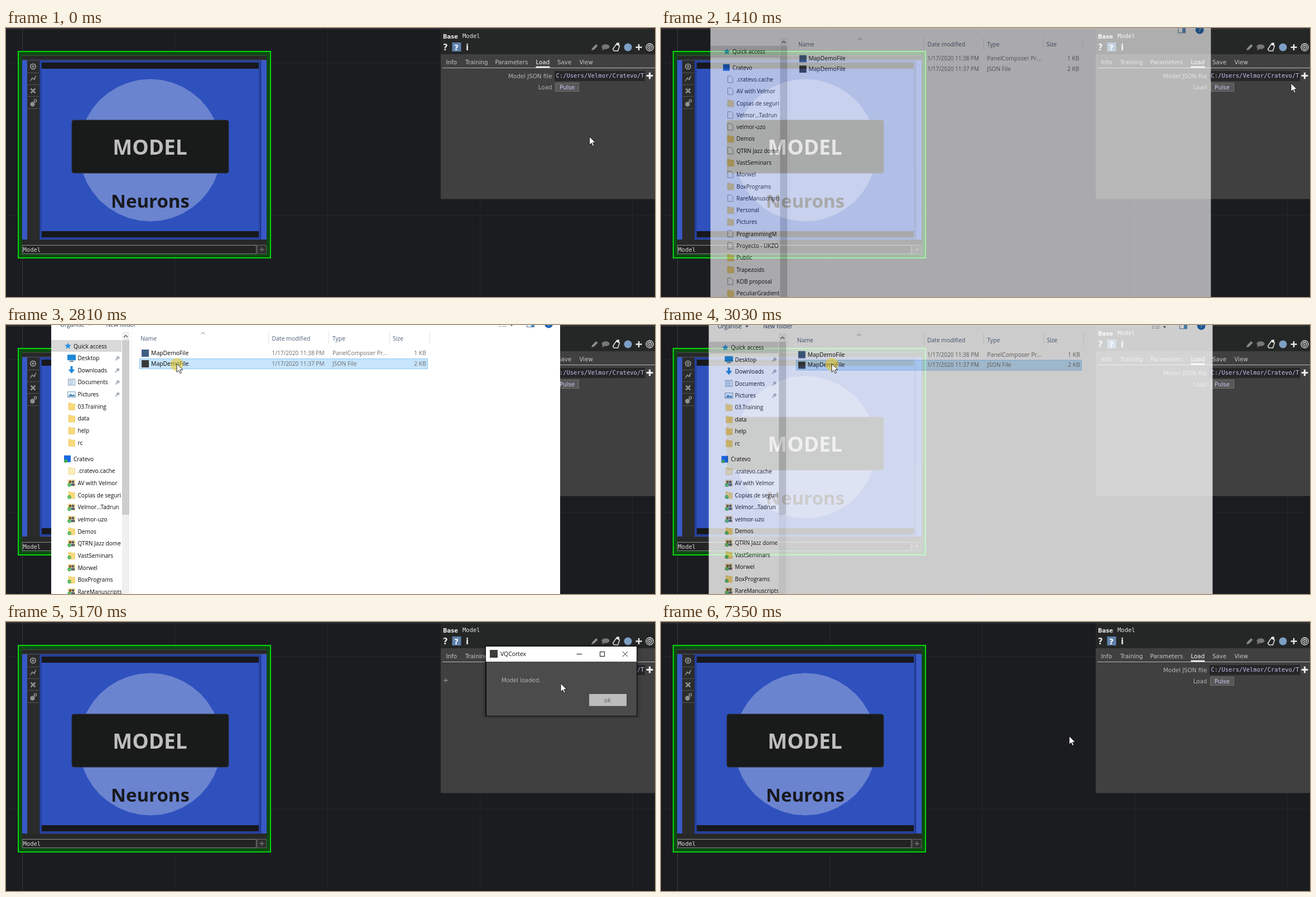
These frames come from a looping animation (1163 px wide and 482 px high, 7.73 s). An HTML page:

```html
<!DOCTYPE html>
<html lang="en">
<head>
<meta charset="utf-8">
<title>Load a model</title>
<style>
html, body { margin: 0; width: 100%; height: 100%; overflow: hidden; background: #1b1c20; }
svg { display: block; }
text { white-space: pre; }
.ui { font-family: "DejaVu Sans", sans-serif; font-size: 10.3px; }
.mono { font-family: "DejaVu Sans Mono", monospace; font-size: 10.5px; }
.win { font-family: "Open Sans", "Noto Sans", sans-serif; font-size: 10.4px; }
.tree .win { font-size: 10.1px; }
.big { font-family: "Open Sans", "Noto Sans", sans-serif; font-weight: 700; text-anchor: middle; }
</style>
</head>
<body>
<svg id="stage" width="100%" height="100%" viewBox="0 0 1163 482"></svg>
<script>
const LOOP = 7730;

// Drawing helpers
const rect = (x, y, w, h, fill, more = '') =>
  `<rect x="${x}" y="${y}" width="${w}" height="${h}" fill="${fill}" ${more}/>`;
const frame = (x, y, w, h, fill, stroke, more = '') =>
  rect(x + .5, y + .5, w - 1, h - 1, fill, `stroke="${stroke}" ${more}`);
const text = (x, y, str, cls, fill, more = '') =>
  `<text x="${x}" y="${y}" class="${cls}" fill="${fill}" ${more}>${str}</text>`;
const line = (d, stroke, width = 1, more = '') =>
  `<path d="${d}" fill="none" stroke="${stroke}" stroke-width="${width}" ${more}/>`;
const shape = (d, fill, more = '') => `<path d="${d}" fill="${fill}" ${more}/>`;
const dot = (x, y, r, fill, more = '') => `<circle cx="${x}" cy="${y}" r="${r}" fill="${fill}" ${more}/>`;
const plus = (x, y, r, color, width) => line(`M${x - r},${y}h${2 * r}M${x},${y - r}v${2 * r}`, color, width);
const group = (id, body, more = '') => `<g id="${id}" ${more}>${body}</g>`;

function backdrop() {
  let s = rect(0, 0, 1163, 482, '#1b1c20');
  for (const x of [302.5, 575.5, 849.5, 1122.5]) s += line(`M${x},0V482`, '#26272b');
  for (const y of [62.5, 335.5]) s += line(`M0,${y}H1163`, '#26272b');
  return s + line('M29.5,0V482', '#38393d') + line('M0,1.5H1163', '#47484a');
}

function node() {
  const disc = Array.from({ length: 40 }, (_, i) => {
    const a = i * Math.PI / 20;
    return (258.5 + 127.5 * Math.cos(a)).toFixed(1) + ',' + (219 + 127.5 * Math.sin(a)).toFixed(1);
  }).join(' ');
  const grey = '#8f8f8f';
  let s = rect(22, 42, 452, 370, '#0d4a12', 'stroke="#05d80a" stroke-width="2"')
    + rect(29, 49, 438, 356, '#272828')
    + line('M29,49.5H467', '#4a4c4a') + line('M29,57.5H467', '#4b5576')
    + rect(29, 58, 438, 321, '#3858c8')
    + rect(38, 58, 22, 321, '#2b2b2c')
    + frame(60, 58, 397, 320, '#26429f', '#1d3589')
    + rect(64, 62, 389, 313, '#17181c')
    + rect(64, 73, 389, 291, '#2f51be')
    + line('M456.5,58V379', '#152a72');
  for (const y of [80.5, 101.5, 122.5, 144.5]) s += line(`M38,${y}h21`, '#555');
  s += dot(48.5, 69, 4.6, 'none', `stroke="${grey}" stroke-width="2"`) + dot(48.5, 69, 2, grey)
    + shape('M42,97l5,-9 2,3 6,-7 -4,10 -3,-3z', grey)
    + line('M44.5,108.5l8,8m0,-8l-8,8', grey, 2.6)
    + dot(47.5, 136.5, 4.2, grey) + dot(52.5, 130.5, 2.2, 'none', `stroke="${grey}" stroke-width="1.5"`)
    + `<polygon points="${disc}" fill="#6b84d0"/>`
    + rect(118, 165, 281, 95, '#191a1a', 'rx="4" stroke="#2a3040"')
    + text(258, 227, 'MODEL', 'big', '#bfbfbf', 'font-size="37"')
    + text(258.5, 322, 'Neurons', 'big', '#18191d', 'font-size="33"')
    + line('M29,388.5H467', '#3a3a3a')
    + frame(29, 389, 420, 16, '#232324', '#858585')
    + text(30.5, 401, 'Model', 'mono', '#d8d8d8')
    + frame(450, 389, 17, 16, '#2d2d2d', '#606060')
    + plus(458.5, 397, 4, '#666', 2);
  return s;
}

function panel() {
  const light = '#e8e8e8', tab = '#c6c6c6';
  let s = rect(779, 2, 384, 304.5, '#404040') + rect(779, 2, 384, 45, '#252626')
    + text(783, 18.5, 'Base', 'ui', light, 'font-weight="bold" style="font-size:10px"')
    + text(818, 18, 'Model', 'mono', light)
    + text(783, 39.5, '?', 'ui', light, 'font-weight="bold" style="font-size:15px"')
    + rect(799.5, 26, 16, 16, '#5f82ac')
    + text(803, 39.5, '?', 'ui', '#fff', 'font-weight="bold" style="font-size:14px"')
    + text(824, 39.5, 'i', 'ui', light, 'font-weight="bold" style="font-size:15px"')
    + shape('M1049,40l1.5,-4 7,-7 3,3 -7,7z', '#8b8b8b')
    + '<ellipse cx="1074.5" cy="33.5" rx="7" ry="4.3" fill="#777"/>' + shape('M1069,36l-1,4 5,-2z', '#777')
    + shape('M1087.5,38l6,-9 6,3 -3,9h-7z', '#252626', `stroke="${light}" stroke-width="1.5"`)
    + rect(1094, 26.5, 5, 4, light)
    + dot(1114.5, 34.5, 7, '#7c9fc4')
    + plus(1134, 34.5, 5.5, light, 2.5)
    + dot(1153.5, 34.5, 6.5, 'none', `stroke="${light}" stroke-width="1.3"`)
    + dot(1153.5, 34.5, 3.5, 'none', `stroke="${light}" stroke-width="1.3"`) + dot(1153.5, 34.5, 1.3, light);
  const tabs = { Info: 788.5, Training: 823, Parameters: 876.5, Load: 949.5, Save: 988, View: 1027.5 };
  for (const name in tabs) s += text(tabs[name], 65, name, 'ui', name === 'Load' ? '#fff' : tab);
  s += line('M782,71.5H1163', '#b9b9b9') + rect(949.5, 68.5, 25, 3, '#e6e6e6')
    + text(978.5, 90, 'Model JSON file', 'ui', '#b4b4b4', 'text-anchor="end"')
    + rect(983, 77, 162, 18, '#262627')
    + text(985.5, 89, 'C:/Users/Velmor/Cratevo/T', 'mono', '#c5bff0')
    + plus(1153.5, 85.5, 5.8, '#eee', 3.2)
    + text(978.5, 110, 'Load', 'ui', '#b4b4b4', 'text-anchor="end"')
    + frame(984, 98, 43, 16, '#575757', '#717171', 'id="pulse"')
    + text(1005.5, 110, 'Pulse', 'ui', '#cdc8f2', 'text-anchor="middle"')
    + group('rowMark', plus(0, 0, 4, '#a0a0a0', 1));
  return s;
}

// File dialog
const folders = ['.cratevo.cache', 'AV with Velmor', 'Copias de seguri', 'Velmor...Tadrun', 'velmor-uzo', 'Demos',
  'QTRN Jazz dome', 'VastSeminars', 'Morwel', 'BoxPrograms', 'RareManuscripts', 'Personal', 'Pictures',
  'ProgrammingM', 'Proyecto - UKZO', 'Public', 'Trapezoids', 'KOB proposal', 'PeculiarGradient'];
const kinds = 'ffdffdfdfdfddffddfd';
const ROW = 21.65;
const INK = '#080808';

const folderIcon = (y, pale) =>
  shape(`M112,${y - 6}h4l1,1.5h6.5v11h-11.5z`, pale ? '#fbeebb' : '#f9d978', 'stroke="#e3c264" stroke-width=".6"');
const pageIcon = y => shape(`M112.5,${y - 6}h6l3.5,3.5v8.5h-9.5z`, '#fff', 'stroke="#777" stroke-width=".8"');
const peopleIcon = y => rect(111, y - 6, 13, 12, '#f3d58a') + dot(115, y - 2, 2.3, '#705440')
  + dot(120, y - 2, 2.3, '#4a5a78') + rect(112, y + 1, 6, 4, '#5d8fc4') + rect(118, y + 1, 5, 4, '#555f70');
const badge = y => dot(113.5, y + 3.5, 3.2, '#3fae49') + line(`M112,${y + 3.5}l1.2,1.2 2,-2.4`, '#fff', .9);
const pin = y => line(`M196,${y + 4}l3,-3M198,${y - 2}l4,4M199.5,${y - 1}l2.5,-2.5M201,${y + 1}l2.5,-2.5`, '#83909c', 1.4);

function quickIcon(i, y) {
  const blue = '#1e88d8';
  return [
    rect(110, y - 6, 15, 10, blue) + rect(114, y + 5, 7, 1.5, '#456'),
    shape(`M115.5,${y - 7}h4v6h4l-6,7 -6,-7h4z`, blue),
    frame(111, y - 6, 13, 12, '#fff', '#7892a8') + line(`M113,${y - 3}h8m-8,3h8m-8,3h8`, '#4d8fc4'),
    frame(110, y - 5, 15, 11, '#e6f3fb', '#8aa0b0') + shape(`M111,${y + 4}l5,-5 3,3 2,-2 3,4z`, '#4b89b8')
  ][i];
}

function tree(early) {
  const label = (x, y, name) => text(x, y + 4, name, 'win', INK);
  let y = 37.5;
  let s = rect(81, 27, 127, 21, '#d9d9d9')
    + shape(`M111,${y - 6}l1.7,4 4.3,.3 -3.3,2.8 1,4.2 -3.7,-2.3 -3.7,2.3 1,-4.2 -3.3,-2.8 4.3,-.3z`, '#2f8fdd')
    + label(121, y, 'Quick access');
  if (!early) {
    ['Desktop', 'Downloads', 'Documents', 'Pictures', '03.Training', 'data', 'help', 'rc'].forEach((name, i) => {
      y += ROW;
      s += (i < 4 ? quickIcon(i, y) + pin(y) : folderIcon(y)) + label(128.5, y, name);
    });
  }
  y += 29;
  s += rect(104, y - 6, 12, 12, '#1769e0') + (early ? '' : dot(107, y + 4, 3, '#3fae49'))
    + label(121, y, 'Cratevo');
  folders.forEach((name, i) => {
    y += ROW;
    const dir = kinds[i] === 'd';
    if (early) s += dir ? folderIcon(y) : pageIcon(y);
    else if (i === 0) s += folderIcon(y, true);
    else s += (dir ? folderIcon(y) : peopleIcon(y)) + badge(y);
    s += label(128.5, y, name);
  });
  return s;
}

function fileRow(y, type, size, minute, icon) {
  const grey = '#6d6d6d';
  return rect(243, y - 6, 13, 13, icon)
    + text(260, y + 4, 'MapDemoFile', 'win', INK)
    + text(476.5, y + 4, `1/17/2020 11:${minute} PM`, 'win', grey, 'style="font-size:10.1px"')
    + text(585, y + 4, type, 'win', grey)
    + text(753, y + 4, size, 'win', grey, 'text-anchor="end"');
}

function fileDialog() {
  const head = '#4c5f78', menu = '#1e395b';
  const toolbar = text(97, 3, 'Organise', 'win', menu) + shape('M147,-2h6l-3,3z', menu)
    + text(179.5, 3, 'New folder', 'win', menu)
    + line('M883,-3.5h5m2,0h7m-14,3h5m2,0h7m-14,3h5m2,0h7', '#8a97a6')
    + shape('M903,-1h6l-3,3z', '#444');
  let s = rect(81, -50, 912, 736, '#fff')
    + group('toolbar', toolbar)
    + frame(933, -7, 14, 11, '#fff', '#5577a0') + rect(941, -6, 5, 9, '#4a90d0')
    + dot(972.5, -2, 7.5, '#1b62b5') + text(972.5, 2, '?', 'win', '#fff', 'text-anchor="middle"');
  for (const x of [470.5, 578.5, 687.5, 759.5]) s += line(`M${x},12V34`, '#e2e2e2');
  const columns = { Name: 241, 'Date modified': 476.5, Type: 585, Size: 693 };
  for (const name in columns) s += text(columns[name], 28, name, 'win', head);
  s += line('M349.5,16.5l3.5,-3.5 3.5,3.5', '#777')
    + frame(239, 60, 517, 19, '#e5f3ff', '#e5f3ff', 'id="pick"')
    + fileRow(50, 'PanelComposer Pr...', '1 KB', 38, '#3f5f86')
    + fileRow(69, 'JSON File', '2 KB', 37, '#3a3a3a')
    + '<svg class="tree" x="81" y="-50" width="126" height="740" viewBox="81 -50 126 740">'
    + group('treeEarly', tree(true)) + group('treeFull', tree(false)) + '</svg>'
    + rect(208, 12, 13, 670, '#f0f0f0') + line('M211,22l3.5,-3.5 3.5,3.5', '#555', 1.3)
    + rect(208, 27, 13, 313, '#cdcdcd', 'id="thumb"')
    + line('M224.5,12V680', '#f2f2f2');
  return s;
}

function messageBox() {
  const ink = '#111';
  return rect(852, 38, 286, 134, '#000', 'rx="6" opacity=".07"') + rect(856, 42, 278, 130, '#000', 'rx="4" opacity=".12"')
    + rect(859, 43, 272, 126, '#0c0c0c')
    + rect(860, 44, 270, 27, '#fff') + rect(861, 71, 269, 97, '#4b4b4b')
    + rect(867, 50, 14, 14, '#3a3d38')
    + text(886, 61, 'VQCortex', 'win', ink)
    + line('M1022.5,57.5h10', ink) + frame(1064, 53, 9, 9, 'none', ink) + line('M1105,53l9,9m0,-9l-9,9', ink)
    + text(888, 108, 'Model loaded.', 'ui', '#b2b2b2', 'style="font-size:10px"')
    + rect(1045, 129, 67, 21.5, '#bcbcbc', 'id="ok"')
    + text(1078, 143.5, 'ok', 'ui', '#606060', 'text-anchor="middle"');
}

const outline = 'stroke="#111" stroke-width=".9"';
const cursors = group('arrow', shape('M0,0v15l3.5,-3.3 2.5,5.4 2.4,-1.1 -2.5,-5.2h4.8z', '#fff', outline))
  + group('sizer', shape('M-10,0l5,-4.5v3.3h10v-3.3l5,4.5 -5,4.5v-3.3h-10v3.3z', '#fff', outline));

document.getElementById('stage').innerHTML = backdrop() + node() + panel()
  + group('files', fileDialog()) + group('message', messageBox())
  + dot(0, 0, 11.5, '#ecca20', 'id="click"') + group('cursor', cursors);

const el = {};
document.querySelectorAll('[id]').forEach(e => { el[e.id] = e; });

// The picture only changes in bursts: start, end, number of steps
const bursts = [[70, 780, 10], [920, 1080, 3], [1320, 2020, 10], [2110, 2340, 4], [2810, 3510, 10], [3590, 4150, 8],
  [4460, 4540, 2], [4770, 4770, 1], [4930, 5640, 10], [5720, 5940, 4], [6640, 6880, 4], [7110, 7350, 4]];

function snap(t) {
  let held = 0;
  for (const [start, end, n] of bursts) {
    const gap = n > 1 ? (end - start) / (n - 1) : 1;
    const i = Math.floor((t + 15 - start) / gap);
    if (i >= 0) held = start + Math.min(i, n - 1) * gap;
  }
  return held;
}

const path = [[0, 1045.5, 194.5], [780, 1150, 86], [1240, 1150, 86], [1398, 1129, 99], [1553, 994, 129],
  [2020, 420, 98], [2030, 420, 98], [2340, 306, 69.5], [3130, 306, 69.5], [3510, 550, 144], [3590, 671, 133],
  [4150, 1007.5, 113], [4850, 1007.5, 113], [5166, 994, 110], [5640, 1018, 154], [5650, 1018, 154],
  [5940, 1073.5, 136], [7030, 1073.5, 136], [7350, 731.5, 204.5]];
const filesFade = [[1240, 0], [1320, .25], [1398, .63], [1475, .9], [1550, 1], [2890, 1], [2966, .93],
  [3043, .78], [3121, .4], [3199, .1], [3277, 0]];
const messageFade = [[4850, 0], [4930, .35], [5009, .8], [5088, 1], [6640, 1], [6720, .7], [6800, .25], [6880, 0]];
const clicks = [[920, 1079], [2810, 3120], [4460, 4539], [6640, 6719]];

const smooth = u => u * u * (3 - 2 * u);
const within = (t, a, b) => t >= a && t < b;

function along(keys, t, ease = u => u) {
  if (t <= keys[0][0]) return keys[0].slice(1);
  for (let i = 1; i < keys.length; i++) {
    const [a, b] = [keys[i - 1], keys[i]];
    if (t <= b[0]) {
      const u = ease((t - a[0]) / (b[0] - a[0]));
      return a.slice(1).map((v, k) => v + (b[k + 1] - v) * u);
    }
  }
  return keys[keys.length - 1].slice(1);
}

const show = (e, on) => e.setAttribute('display', on ? 'inline' : 'none');

function fade(e, alpha, cx, cy) {
  const k = 1 - .045 * (1 - alpha);
  show(e, alpha > 0);
  e.setAttribute('opacity', alpha);
  e.setAttribute('transform', `translate(${cx * (1 - k)},${cy * (1 - k)}) scale(${k})`);
}

function draw(ms) {
  const t = snap(ms);
  const [x, y] = along(path, t, smooth);
  el.cursor.setAttribute('transform', `translate(${x},${y})`);
  const sizing = within(t, 1500, 1700) && Math.abs(x - 993) < 6;
  show(el.arrow, !sizing);
  show(el.sizer, sizing);

  show(el.click, clicks.some(([a, b]) => within(t, a, b)));
  el.click.setAttribute('transform', `translate(${x},${y + 1})`);
  el.click.setAttribute('opacity', .55);

  fade(el.files, along(filesFade, t)[0], 537, 320);
  const early = t < 1460;
  show(el.toolbar, !early);
  show(el.treeEarly, early);
  show(el.treeFull, !early);
  el.thumb.setAttribute('height', early ? 640 : 313);
  const picked = t >= 2810;
  show(el.pick, picked || (t > 1600 && within(y, 60, 80)));
  el.pick.setAttribute('fill', picked ? '#c6e4fb' : '#e5f3ff');
  el.pick.setAttribute('stroke', picked ? '#90c8f6' : '#e5f3ff');

  fade(el.message, along(messageFade, t)[0], 995, 106);
  el.ok.setAttribute('fill', within(t, 5860, 6900) ? '#cacaca' : '#bcbcbc');
  el.pulse.setAttribute('fill', within(t, 4460, 4770) ? '#767676' : '#575757');

  const free = t < 1320 || within(t, 3300, 4930);
  const inPanel = free && within(x, 779, 1140);
  const onFile = inPanel && within(y, 76, 96);
  const onLoad = (inPanel && within(y, 96, 116)) || within(t, 4150, 6800);
  show(el.rowMark, onFile || onLoad);
  el.rowMark.setAttribute('transform', `translate(788,${onFile ? 85.5 : 104.5})`);
}

const began = performance.now();
function tick() {
  draw((performance.now() - began) % LOOP);
  requestAnimationFrame(tick);
}
tick();
</script>
</body>
</html>
```
